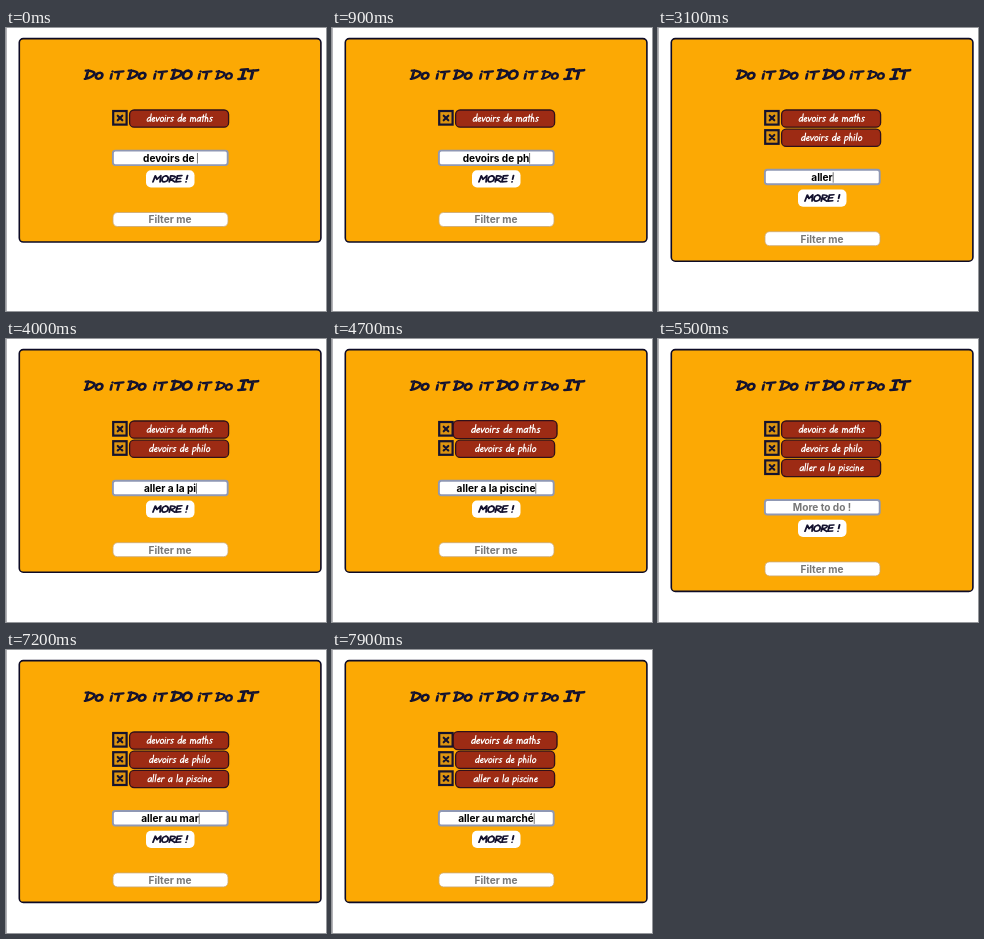
Animation, 320 px wide and 283 px high, one loop 8000 ms. Source, as an HTML page:

```html
<!DOCTYPE html>
<html lang="fr">
<head>
<meta charset="utf-8">
<title>Do it</title>
<style>
  html, body { margin: 0; width: 100%; height: 100%; overflow: hidden; background: #fff; }
  svg { display: block; width: 320px; height: 283px; }
  path { fill: none; stroke-linecap: round; stroke-linejoin: round; }
  text { font: 700 10.1px Inter, "Liberation Sans", sans-serif; text-anchor: middle; white-space: pre; }
  .ink { stroke: #14122f; }
  .chalk { stroke: #fff; stroke-width: 1.1; }
  .hint { fill: #777; }
</style>
</head>
<body>
<svg id="stage" viewBox="0 0 320 283">
  <rect width="1" height="283" fill="#b4b4b8"/>
  <rect id="panel" x="13.3" y="10.6" width="301.6" height="203.4" rx="4" fill="#fca904" stroke="#0d0b26" stroke-width="1.6"/>
  <g id="title" role="img" aria-label="Do it Do it DO it Do IT"></g>
  <g id="list"></g>
  <g id="form">
    <rect x="106.9" y="122.6" width="114.8" height="14.5" rx="2.5" fill="#fff" stroke="#8f98b4" stroke-width="1.9"/>
    <text id="entry" x="164" y="133.6"></text>
    <rect id="caret" y="125" width=".8" height="10.5" fill="#555"/>
    <rect x="140" y="142.3" width="48.5" height="17.2" rx="5" fill="#fff"/>
    <g id="more" role="img" aria-label="More !"></g>
    <rect x="107" y="184.5" width="115" height="14" rx="4.5" fill="#fff" stroke="#c9a878" stroke-width=".8"/>
    <text class="hint" x="164" y="195.4">Filter me</text>
  </g>
</svg>
<script>
const LOOP = 8000, ROW = 19.2;
const $ = id => document.getElementById(id);

function add(parent, tag, attrs) {
  const el = document.createElementNS('http://www.w3.org/2000/svg', tag);
  for (const key in attrs) el.setAttribute(key, attrs[key]);
  parent.append(el);
  return el;
}

// Each glyph is [advance, stroke path] with the baseline at y = 0.
const marker = {
  D: [9.6, 'M2.4 -9.3L1.2 0M.2 -8.9Q9.4 -8.8 8.4 -5Q7 -1.2 .4 0'],
  O: [8.4, 'M4.5 -8.6C-.6 -8 -.8 0 3.4 0C8.8 -.2 9 -8.6 3.8 -8.4'],
  o: [7.4, 'M4 -6.8C-.4 -6.4 -.4 0 3.2 0C7.6 -.2 7.6 -7 3.4 -6.6'],
  I: [6.8, 'M1 -9L6.6 -9.4M3.8 -9L2.6 0M0 .1L5.4 -.4'],
  i: [4.2, 'M1.5 -5.6L1.2 0M1.9 -8.6l.2 .2'],
  T: [9, 'M.4 -7.8L8.4 -8.6M4.4 -8.2L3.6 0'],
  M: [10.2, 'M.4 0L2.2 -8.6L4.8 -3.6L8.6 -8.8L8.8 0'],
  R: [8, 'M1 0L1.8 -8.4Q8 -8.8 7 -6.2Q6 -4 2 -3.8L7.4 0'],
  E: [7.8, 'M6.8 -8.8L1.6 -8.4L.8 0L6.4 -.5M1.4 -4.4L5.8 -4.8'],
  '!': [3, 'M2 -9L1.6 -3.8M1.3 -.1v.1'],
  ' ': [3.6, '']
};

const bowl = 'M3.4 -3.7C1.4 -4.8 0 -2.6 .3 -1C.9 .8 2.8 -.6 3.4 -2.6';
const stem = (x, top, end = 0) => `M${x} ${top}L${x} ${end}`;
const hump = x => `M${x} -2.4C${x + .5} -4.6 ${x + 2.6} -5 ${x + 2.5} 0`;
const brush = {
  a: [4.6, bowl + stem(3.5, -4)],
  c: [3.8, 'M3 -3.6C1.2 -4.8 0 -2.4 .4 -.9Q1.2 .5 3 -.5'],
  d: [4.6, bowl + stem(3.5, -7.6)],
  e: [4.2, 'M.5 -2Q3.2 -2.2 3 -3.4C2.4 -4.8 .3 -3.4 .4 -1.4Q1 .7 3.4 -.7'],
  h: [4.5, stem(.5, -7.6) + hump(.5)],
  i: [2.3, stem(.6, -4) + 'M.7 -6.2v.1'],
  l: [2.3, stem(.6, -7.6)],
  m: [6.8, stem(.5, -4) + hump(.5) + hump(3)],
  n: [4.5, stem(.5, -4) + hump(.5)],
  o: [4.6, 'M2 -4C0 -4 -.3 0 1.8 0C4.2 0 4.3 -4 2 -4'],
  p: [4.6, stem(.5, -4, 3) + 'M.5 -3C2 -5 4 -4 3.5 -2Q2.6 .2 .5 -.3'],
  r: [3.6, stem(.5, -4) + 'M.5 -2.4Q1.4 -4.4 3 -3.7'],
  s: [3.8, 'M2.9 -3.9C.6 -4.6 .2 -2.8 1.6 -2.2C3.4 -1.4 2.4 .4 .2 -.3'],
  t: [3.4, stem(1.4, -6.6) + 'M0 -4.3L3 -4.6'],
  v: [4.2, 'M.2 -4L1.5 0L3.6 -4.2'],
  ' ': [3.5, '']
};

const widthOf = (font, str) => [...str].reduce((sum, c) => sum + font[c][0], 0);

function letter(parent, font, str, x, y, [sx, sy], attrs) {
  const g = add(parent, 'g', { transform: `translate(${x} ${y}) skewX(-8) scale(${sx} ${sy})` });
  let pen = 0;
  for (const c of str) {
    const [advance, d] = font[c];
    add(g, 'path', { d, transform: `translate(${pen} 0)`, ...attrs });
    pen += advance;
  }
}

const ink = w => ({ class: 'ink', 'stroke-width': w });
const wide = s => [s, s * .84];
[['Do', 78.5, 1.08], ['iT', 103.5, 1.02], ['Do', 121.5, 1.08], ['iT', 147, 1.02],
 ['DO', 165, 1.15], ['iT', 191.5, 1.02], ['oo', 0, 0], ['Do', 209.5, .98], ['IT', 232.5, 1.2]]
  .filter(([, , s]) => s)
  .forEach(([word, x, s]) => letter($('title'), marker, word, x, 50.8, wide(s), ink(2.5)));
letter($('more'), marker, 'MORE !', 146.6, 153.9, wide(.85), ink(2.2));

const items = ['devoirs de maths', 'devoirs de philo', 'aller a la piscine'].map((label, i) => {
  const row = add($('list'), 'g', { transform: `translate(0 ${i * ROW})` });
  add(row, 'rect', { x: 107.2, y: 83, width: 13.4, height: 13.6, fill: '#dd9410', stroke: '#14122f', 'stroke-width': 2.2 });
  add(row, 'path', { d: 'M111.7 87.7l4.6 4.6m0 -4.6l-4.6 4.6', ...ink(2.1) });
  const tag = add(row, 'g', { role: 'img', 'aria-label': label });
  add(tag, 'rect', { x: 123.6, y: 82, width: 99, height: 17.2, rx: 4.5, fill: '#9d2b14', stroke: '#32101a', 'stroke-width': 1.3 });
  letter(tag, brush, label, 173.8 - widthOf(brush, label) / 2, 93.4, [1, 1], { class: 'chalk' });
  return { row, tag };
});

// Typing: phrase, characters already there, first key, ms per key, time of sending.
const typing = [
  ['devoirs de philo', 11, 500, 250, 2350],
  ['aller a la piscine', 0, 2600, 110, 5000],
  ['aller au marché', 0, 5600, 140, LOOP]
];

function pulse(t) {
  const away = Math.abs((t - 1350 + 1600) % 3200 - 1600);
  return away < 350 ? 1 + .08 * Math.cos(away / 350 * Math.PI / 2) ** 2 : 1;
}

function draw(now) {
  const t = now % LOOP;
  const sent = typing.findIndex(step => t < step[4]);
  const [phrase, ready, start, pace] = typing[sent];
  const keys = t < start ? 0 : Math.floor((t - start) / pace) + 1;
  const value = phrase.slice(0, ready + keys);

  const entry = $('entry');
  entry.textContent = value || 'More to do !';
  entry.setAttribute('class', value ? '' : 'hint');
  $('caret').style.display = value ? '' : 'none';
  $('caret').setAttribute('x', 164 + entry.getComputedTextLength() / 2);

  items.forEach(({ row }, i) => row.style.display = i <= sent ? '' : 'none');
  items[0].tag.setAttribute('transform', `translate(173 90.6) scale(${pulse(t)}) translate(-173 -90.6)`);
  $('form').setAttribute('transform', `translate(0 ${sent * ROW})`);
  $('panel').setAttribute('height', 203.4 + sent * ROW);
}

const origin = performance.now();
function tick() {
  draw(performance.now() - origin);
  requestAnimationFrame(tick);
}
tick();
</script>
</body>
</html>
```
